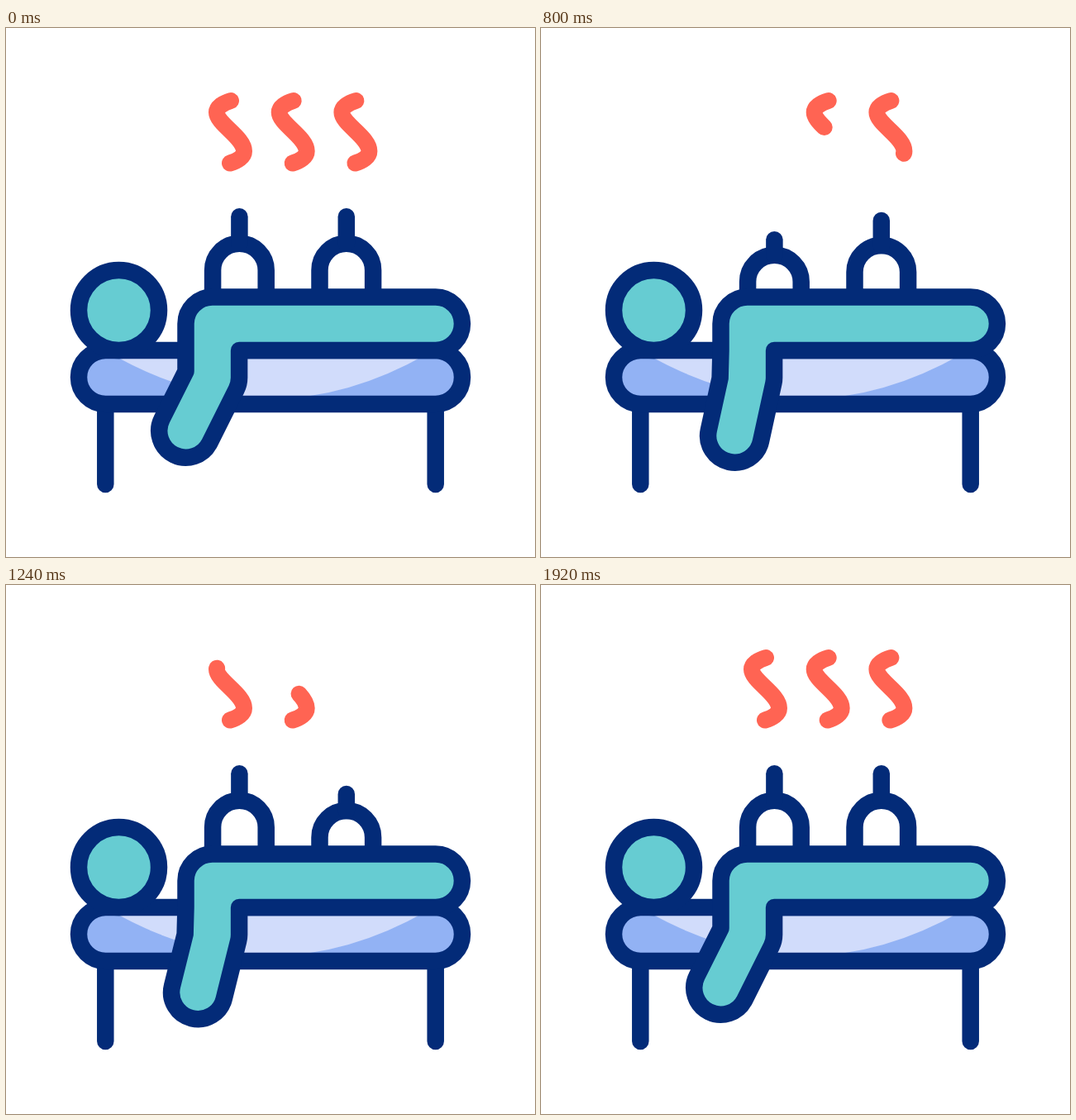
Animation of 640x640 px, one loop 1960 ms. Source, as an HTML page:

```html
<!DOCTYPE html>
<html lang="en">
<head>
<meta charset="utf-8">
<title>Cupping therapy</title>
<style>
  html, body { margin: 0; width: 100%; height: 100%; overflow: hidden; background: #fff; }
  svg { display: block; width: 100%; height: 100%; }
</style>
</head>
<body>
<svg viewBox="0 0 640 640" fill="none" stroke="#032b78" stroke-width="20.5" stroke-linecap="round" stroke-linejoin="round">
  <g id="steam" stroke="#ff6453" stroke-width="20"></g>
  <path d="M120.3 455V552M519.7 455V552"/>
  <rect x="88" y="390" width="464" height="65" rx="32.5" fill="#92b2f4" stroke="none"/>
  <path d="M120 390Q318.5 507.6 517 390Z" fill="#d1dcfb" stroke="none"/>
  <rect x="88" y="390" width="464" height="65" rx="32.5"/>
  <circle cx="136.5" cy="341.5" r="48.5" fill="#66ccd2"/>
  <g id="cups" stroke-linecap="butt"></g>
  <path id="body" fill="#66ccd2"/>
</svg>
<script>
const LOOP = 1960;
const $ = id => document.getElementById(id);
const clamp = u => Math.min(1, Math.max(0, u));
const ramp = (t, start, length) => clamp((t - start) / length);
const smooth = u => u * u * (3 - 2 * u);
// Rises from `up`, holds, then falls from `down`.
const pulse = (t, up, down, length) => smooth(ramp(t, up, length)) - smooth(ramp(t, down, length));

function addPath(parent, attrs) {
  const path = document.createElementNS("http://www.w3.org/2000/svg", "path");
  for (const name in attrs) path.setAttribute(name, attrs[name]);
  return parent.appendChild(path);
}

const wisps = [0, 1, 2].map(i => addPath($("steam"), {
  d: "M272 88C262 91 255 96 255 102C255 116 288 132 288 149C288 156 280 161 271 163.5",
  transform: `translate(${i * 75.7} 0)`,
  pathLength: 100
}));

const cups = [282.4, 411.8].map(x => ({
  x,
  dome: addPath($("cups"), {}),
  knob: addPath($("cups"), { "stroke-linecap": "round" })
}));

function drawWisp(path, t) {
  const gone = ramp(t, 120, 640) ** 2;
  const back = 1 - (1 - ramp(t, 893, 640)) ** 2;
  const from = back > 0 ? 100 * (1 - back) : 0;
  const to = back > 0 ? 100 : 100 * (1 - gone);
  path.style.display = to - from > 0.01 ? "" : "none";
  path.setAttribute("stroke-dasharray", `${to - from} 300`);
  path.setAttribute("stroke-dashoffset", -from);
}

function drawCup({ x, dome, knob }, t) {
  const press = 28 * pulse(t, 360, 820, 430);
  const top = 260.7 + press / 2;
  dome.setAttribute("d", `M${x - 32.3} 325.5V${top + 32.3}a32.3 32.3 0 0 1 64.6 0V325.5`);
  knob.setAttribute("d", `M${x} ${228.3 + press}V${top}`);
}

function drawBody(t) {
  const rest = 26.6, swing = 14.3 * pulse(t, 234, 1115, 588);
  const elbow = { x: 249.8, y: 423 }, r = 32.3, reach = 72;
  // Point of the forearm, given across and along its axis.
  const at = (across, along, degrees = rest - swing) => {
    const a = degrees * Math.PI / 180, c = Math.cos(a), s = Math.sin(a);
    return `${elbow.x + across * c - along * s} ${elbow.y + across * s + along * c}`;
  };
  const crook = -r * Math.tan(rest * Math.PI / 360);
  // The inner crook of the elbow is fixed to the forearm and turns with it.
  const crookAlong = -crook;
  $("body").setAttribute("d",
    `M282.1 390V423A${r} ${r} 0 0 1 ${at(r, 0)}L${at(r, reach)}` +
    `A${r} ${r} 0 0 1 ${at(-r, reach)}L${at(-r, crookAlong)}L217.5 390V357.8` +
    `A${r} ${r} 0 0 1 249.8 325.5H519.7A32.25 32.25 0 0 1 519.7 390Z`);
}

function draw(t) {
  wisps.forEach((path, i) => drawWisp(path, t - i * 198));
  cups.forEach((cup, i) => drawCup(cup, t - i * 330));
  drawBody(t);
}

const begin = performance.now();
function tick() {
  draw((performance.now() - begin) % LOOP);
  requestAnimationFrame(tick);
}
draw(0);
requestAnimationFrame(tick);
</script>
</body>
</html>
```
